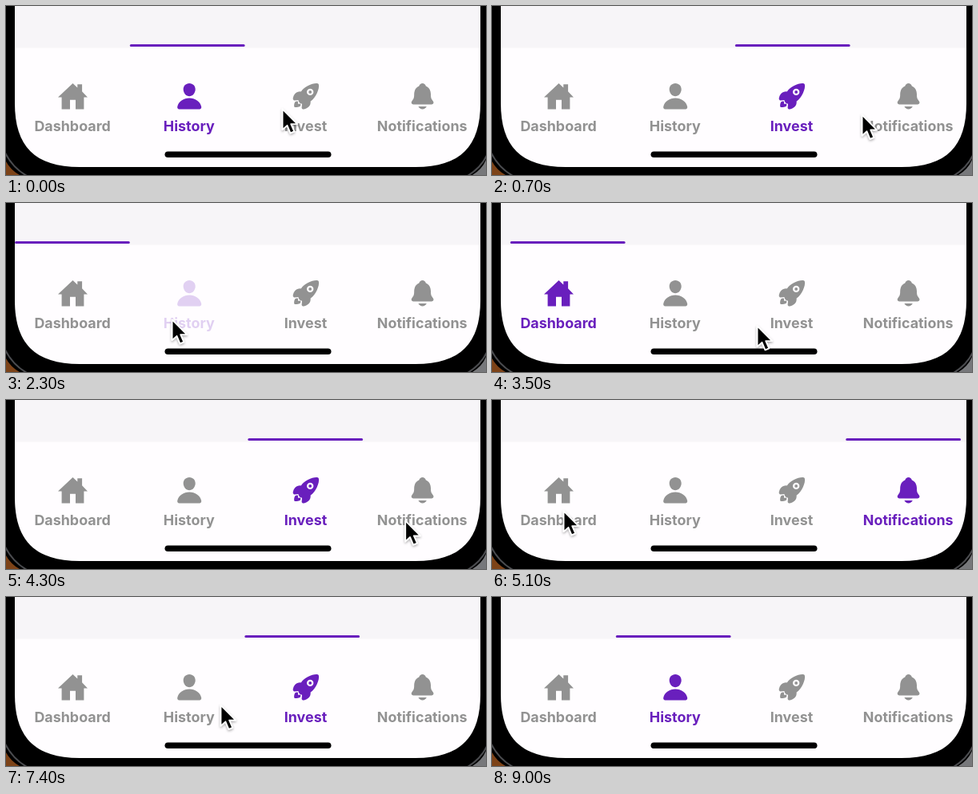
These frames come from a looping animation (600x212 px, 9200 ms). An HTML page:

```html
<!DOCTYPE html>
<html lang="en">
<head>
<meta charset="utf-8">
<title>Tab bar</title>
<style>
html, body { margin: 0; width: 100%; height: 100%; overflow: hidden; background: #000; }
svg { display: block; width: 100vw; height: 100vh; }
text { font: 700 17.9px Inter, "Liberation Sans", sans-serif; text-anchor: middle; }
</style>
</head>
<body>
<svg viewBox="0 0 600 212">
  <defs>
    <clipPath id="screen"><path d="M11 0V122C11 176 36 202 92 202H512C568 202 593 176 593 122V0Z"/></clipPath>
    <filter id="shadow" x="-50%" y="-50%" width="200%" height="200%">
      <feDropShadow dx="0" dy="1.5" stdDeviation="1.5" flood-opacity=".35"/>
    </filter>
  </defs>
  <rect width="600" height="212"/>
  <path d="M-2 182Q7 202 26 213" fill="none" stroke="#4a4b4e" stroke-width="2"/>
  <path d="M0 195Q6 206 17 212H0Z" fill="#7d4318"/>
  <path d="M602 185Q595 202 577 213" fill="none" stroke="#4a4b4e" stroke-width="2"/>
  <path d="M600 193Q595 205 583 212H600Z" fill="#77787b"/>
  <g clip-path="url(#screen)">
    <rect width="600" height="212" fill="#fffdff"/>
    <rect width="600" height="52.5" fill="#f7f5f8"/>
    <rect id="bar" y="48" width="143.8" height="3" rx="1.5"/>
    <g id="tabs"></g>
    <rect x="198.5" y="182.5" width="208" height="7.6" rx="3.8"/>
  </g>
  <g id="cursor" filter="url(#shadow)">
    <path d="M.6 1.3V27.2L6.5 21.8L10.5 31.4L15.3 29.4L11.2 20.1H19.2Z" stroke="#fff" stroke-width="1.8" stroke-linejoin="round"/>
  </g>
</svg>
<script>
const LOOP = 9200, STEP = 100;
const GREY = '#929292', PURPLE = '#691fbd';
const FIRST_TAB = 1, HIDE_AT = 8300;
const LEFT = 11, SLOT = 145.7, BAR = 143.8;

// Icons are drawn around their own centre
const TABS = [
  ['Dashboard', 'M11.6-5.9V-15H5.8V-10.8L0-16.2-18.5 1.2H-13.9V16.2H-3.5V4.6H3.5V16.2H13.9V1.2H18.5Z'],
  ['History', 'M0-16.2C4.5-16.2 7.9-12.6 7.5-8C7.1-3.6 3.8 0 0 0S-7.1-3.6-7.5-8C-7.9-12.6-4.5-16.2 0-16.2ZM12.7 16.2H-12.7C-14.3 16.2-15.3 14.6-15 13.3C-13.6 6.3-7 2.3 0 2.3S13.6 6.3 15 13.3C15.3 14.6 14.3 16.2 12.7 16.2Z'],
  ['Invest', 'M16-14.8Q15.8-15.8 14.8-16C9.5-17.3-1.9-12.2-6.2-5.8C-12.5-6.2-15-2.5-16.2 2.6C-16.4 4-15.5 5.4-14.2 5.3L-9.5 4.8C-9.3 7.2-7.3 9.3-4.8 9.6L-5.3 14.2C-5.4 15.5-4 16.4-2.6 16.2C2.5 15 6.2 12.5 5.8 6.3C12.2 1.9 17.3-9.5 16-14.8ZM1.1-5.3a4.2 4.2 0 108.4 0 4.2 4.2 0 10-8.4 0ZM3.4-5.3a1.9 1.9 0 103.8 0 1.9 1.9 0 10-3.8 0ZM-7 9.3C-10 9.8-10.2 9.5-9.8 6.7C-13.5 5.2-14.9 8.5-14.7 12.8Q-14.5 13.8-13.5 13.8C-9.5 14-6 13-6.6 10.3Q-6.7 9.4-7 9.3Z'],
  ['Notifications', 'M13.3 6.2C11.2 3.6 10.4 2.6 10.4-2.4C10.4-7 8.5-10.7 4.3-12.6C3.6-14.9 2-16.2 0-16.2S-3.6-14.9-4.3-12.6C-8.5-10.7-10.4-7-10.4-2.4C-10.4 2.6-11.2 3.6-13.3 6.2C-14.6 8-13.5 10.4-11.2 10.4H11.2C13.5 10.4 14.6 8 13.3 6.2ZM0 16.2C2.1 16.2 4.1 15 5.1 13.1L4.8 12.7H-4.8L-5.1 13.1C-4.1 15-2.1 16.2 0 16.2Z'],
];

// Stops of the pointer tip; a tap selects the tab below it
const TAP = true;
const STOPS = [
  [0, 345, 128], [370, 374, 133, TAP], [950, 520, 137, TAP], [1300, 168, 133],
  [1810, 84, 139, TAP], [2300, 207, 145, TAP], [2750, 415, 141], [3285, 90, 141, TAP],
  [3500, 331, 153], [3850, 372, 152, TAP], [4420, 515, 150, TAP], [5100, 89, 138],
  [5250, 86, 140, TAP], [6200, 391, 160], [6500, 391, 135], [6810, 382, 140, TAP],
  [7750, 216, 132, TAP], [LOOP, 216, 132],
];
const TAPS = STOPS.filter(stop => stop[3]).map(([at, x]) => [at, Math.floor((x - LEFT) / SLOT)]);

const $ = id => document.getElementById(id);
const barX = tab => LEFT + BAR * tab;
const mix = (a, b, p) => a + (b - a) * p;
const smooth = p => p * p * (3 - 2 * p);

$('bar').setAttribute('fill', PURPLE);
$('tabs').innerHTML = TABS.map(([name, icon], i) =>
  `<g transform="translate(${83.5 + SLOT * i} 113.2)"><path fill-rule="evenodd" d="${icon}"/><text x="-.4" y="43.6">${name}</text></g>`).join('');
const tabs = [...$('tabs').children];

// Remaining share of the distance on an underdamped spring
function spring(ms) {
  const t = Math.max(0, ms) / 1000, decay = 11;
  const w = Math.sqrt(230.2 - decay * decay);
  return Math.exp(-decay * t) * (Math.cos(w * t) + decay / w * Math.sin(w * t));
}

function pointer(t) {
  const i = STOPS.findIndex(stop => stop[0] > t);
  const [t0, x0, y0] = STOPS[i - 1], [t1, x1, y1] = STOPS[i];
  const p = smooth((t - t0) / (t1 - t0));
  return [mix(x0, x1, p), mix(y0, y1, p)];
}

// Dims just before the tap and recovers after it
function pressOpacity(tab, t) {
  const tap = TAPS.find(([at, target]) => target === tab && t >= at - 100 && t <= at + 200);
  if (!tap) return 1;
  const d = t - tap[0];
  return mix(.2, 1, smooth(d < 0 ? -d / 100 : d / 200));
}

function draw(t) {
  let active = FIRST_TAB, x = barX(active);
  for (const [at, tab] of TAPS) {
    if (t < at) break;
    x = mix(barX(tab), barX(active), spring(t - at - 30));
    active = tab;
  }
  $('bar').setAttribute('x', x);
  tabs.forEach((g, i) => {
    g.setAttribute('fill', i === active ? PURPLE : GREY);
    g.setAttribute('opacity', pressOpacity(i, t));
  });
  $('cursor').setAttribute('visibility', t < HIDE_AT ? 'visible' : 'hidden');
  $('cursor').setAttribute('transform', `translate(${pointer(t)})`);
}

const start = performance.now();
function tick() {
  const t = (performance.now() - start) % LOOP;
  draw(Math.floor(t / STEP) * STEP);
  requestAnimationFrame(tick);
}
tick();
</script>
</body>
</html>
```
